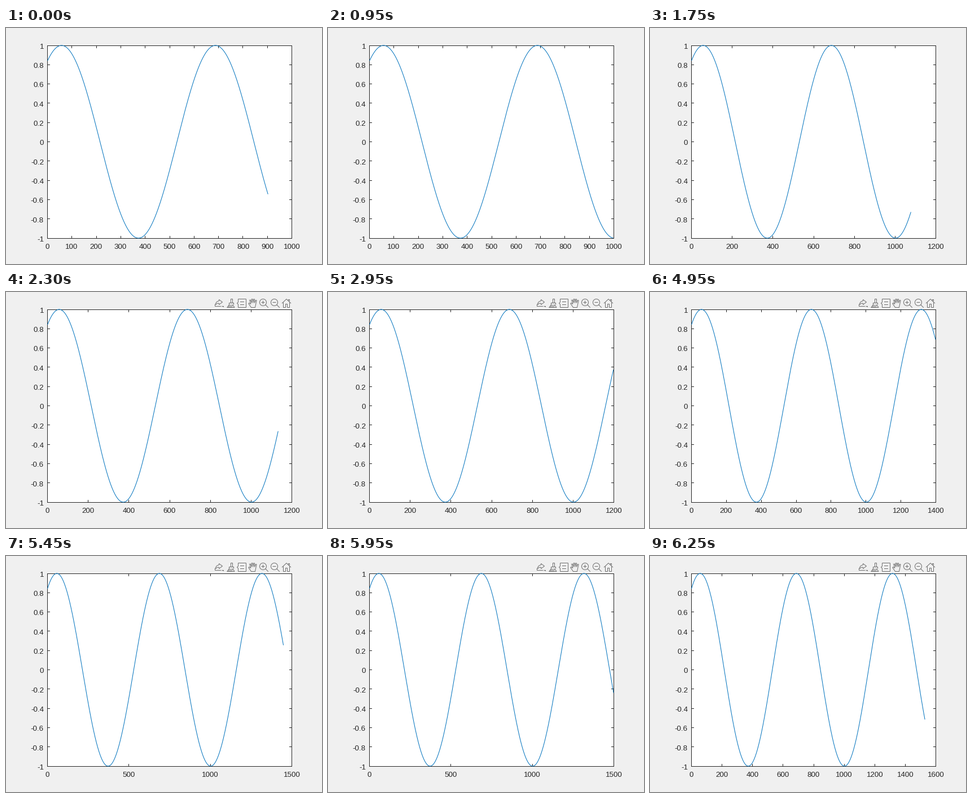
A matplotlib script that plays this animation: 560x420 px, repeating every 6300 ms.

```python
import numpy as np
import matplotlib.pyplot as plt
from matplotlib.animation import FuncAnimation

W, H, DPI = 560, 420, 100
PX = 72 / DPI                      # points per pixel
L, R, T, B = 73.5, 506.5, 31.5, 374.5   # pixel centres of the axes box
FRAMES, INTERVAL = 126, 50
START, GROWTH = 901, 5             # samples at first, samples added per step
TOOLBAR_AT = 46
INK, BLUE, ICON = "#262626", "#0072bd", "#6e6e6e"

plt.rcParams["font.family"] = "Liberation Sans"
fig = plt.figure(figsize=(W / DPI, H / DPI), dpi=DPI, facecolor="#f0f0f0")
ax = fig.add_axes([0, 0, 1, 1])
ax.set_xlim(0, W)
ax.set_ylim(H, 0)
ax.axis("off")


def stroke(xs, ys, color=INK, z=2):
    line, = ax.plot(xs, ys, color=color, lw=PX, zorder=z, snap=False,
                    solid_capstyle="butt", solid_joinstyle="miter")
    return line


def label(x, y, text, ha):
    return ax.text(x, y, text, color=INK, fontsize=40 / 3 * PX,
                   ha=ha, va="baseline")


def curve_x(share):
    return 73.2 + 434 * share


def curve_y(v):
    return 202.5 - 171.5 * v


def tick_x(share):
    return np.floor(L + (R - L) * share) + 0.5


def x_scale(count):
    """Smallest round limit with at most ten intervals, and its tick step."""
    options = [(-(-count // step) * step, step) for step in (100, 200, 500)]
    return min(o for o in options if o[0] <= 10 * o[1])


# Axes box, y ticks and labels
ax.fill([L, R, R, L], [T, T, B, B], "w", lw=0, zorder=1, snap=False)
for y in (T, B):
    stroke([L - 0.5, R + 0.5], [y, y])
for x in (L, R):
    stroke([x, x], [T, B])
for k in range(-5, 6):
    y = curve_y(k / 5)
    row = np.floor(y) + 0.5
    stroke([L, L + 4.5, np.nan, R - 4.5, R], [row] * 5)
    label(67, round(y + 5.8), f"{k / 5:g}", "right")

x_ticks = stroke([], [])
x_labels = [label(0, 393, "", "center") for _ in range(11)]
curve = stroke([], [], BLUE, 3)

# Toolbar icons
toolbar = []


def icon(xs, ys):
    toolbar.append(stroke(xs, ys, ICON))


def mirrored(cx, *half):
    """Outline from (offset, y) points and their reflection about cx."""
    pts = [(cx - d, y) for d, y in half] + [(cx + d, y) for d, y in half[::-1]]
    icon(*zip(*pts))


def share_icon():
    a = np.linspace(np.pi, 1.5 * np.pi, 12)
    for rx, ry in ((6, 6.5), (5, 2.5)):
        icon(377.5 + rx * np.cos(a), 22.5 + ry * np.sin(a))
    icon([377.5, 377.5, 383.5, 377.5, 377.5], [16, 13.5, 18, 22.5, 20])
    icon([370.5, 370.5, 381], [21.5, 25.5, 25.5])
    toolbar.extend(ax.fill([380.5, 385.5, 385.5], [24.5, 24.5, 27],
                           color=ICON, lw=0))


def brush_icon():
    mirrored(400, (1.5, 19.5), (1.5, 12.5))
    mirrored(399.5, (4, 22.5), (4, 19.5))
    mirrored(398.5, (3, 22.5), (6.5, 27.5))
    icon([391.5, 405], [27.5, 27.5])
    for x in (395.5, 398, 400.5):
        icon([x + 1, x - 1], [22.5, 27.5])


def tip_icon():
    for y in (12.5, 27.5):
        icon([411.5, 425.5], [y, y])
    for y in (17.5, 22.5):
        icon([415, 422], [y, y])
    icon([425.5, 425.5], [12.5, 27.5])
    icon([411.5, 411.5, 409.5, 411.5, 411.5], [12.5, 18, 20, 22, 27.5])


def hand_icon():
    xs, ys = [434.5, 429.8, 431, 433.8], [27.5, 20.5, 19.5, 21.5]
    for k in range(4):
        x = 434 + 2.6 * k
        lean = 0.9 * (k - 1.5)
        tip = 12.5 + 0.9 * (k - 1.4) ** 2
        xs += [x + lean - 0.9, x + lean + 0.9, x + 1.3]
        ys += [tip, tip, 19.5]
    icon(xs + [441.5, 434.5], ys + [27.5, 27.5])


def zoom_icon(cx, plus):
    a = np.linspace(0, 2 * np.pi, 40)
    icon(cx + 6 * np.cos(a), 18.5 + 6 * np.sin(a))
    icon([cx + 4.2, cx + 9.3], [22.7, 27.8])
    icon([cx - 3, cx + 3], [18.5, 18.5])
    if plus:
        icon([cx, cx], [15.5, 21.5])


def home_icon():
    mirrored(497, (8, 20.2), (0, 12.6))
    mirrored(497, (1.5, 27.5), (1.5, 21.5))
    for side in (-1, 1):
        icon(497 + side * np.array([5.5, 5.5, 1.5]), [18.5, 27.5, 27.5])
    mirrored(501.5, (1, 16.5), (1, 13.5))


share_icon()
brush_icon()
tip_icon()
hand_icon()
zoom_icon(455.5, True)
zoom_icon(475.5, False)
home_icon()


def update(i):
    count = START + GROWTH * i
    limit, step = x_scale(count)

    n = np.arange(1, count + 1)
    curve.set_data(curve_x(n / limit), curve_y(np.sin(1 + (n - 1) / 100)))

    values = np.arange(0, limit + 1, step)
    cols = tick_x(values / limit)
    rows = [T, T + 4.5, np.nan, B - 4.5, B, np.nan]
    x_ticks.set_data(np.repeat(cols, len(rows)), np.tile(rows, len(cols)))

    for text in x_labels:
        text.set_text("")
    for text, v in zip(x_labels, values):
        text.set_text(str(v))
        text.set_x(72.8 + 434 * v / limit)

    for part in toolbar:
        part.set_visible(i >= TOOLBAR_AT)
    return []


anim = FuncAnimation(fig, update, frames=FRAMES, interval=INTERVAL,
                     init_func=lambda: update(0), repeat=True,
                     repeat_delay=0, blit=False)
plt.show()
```
